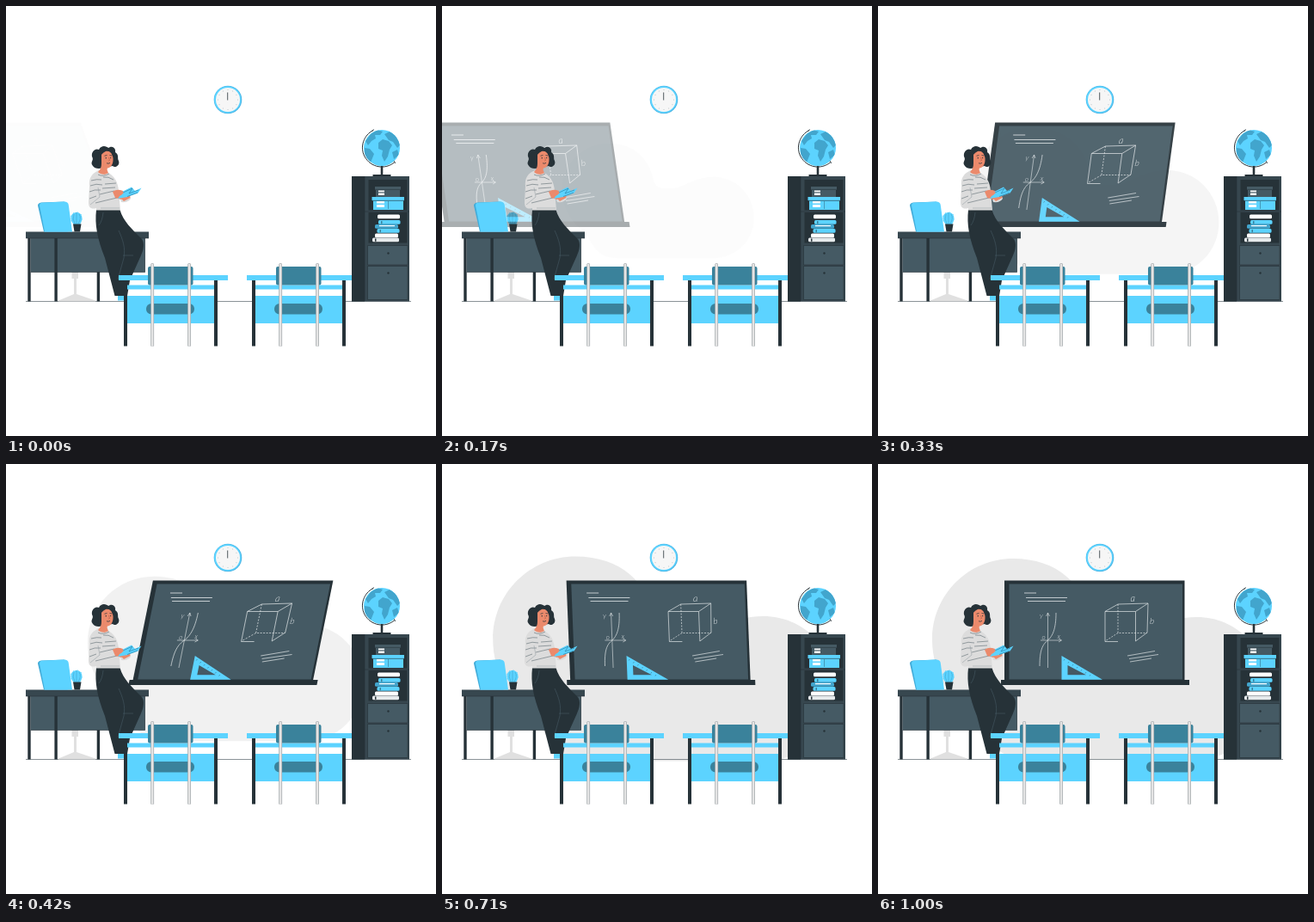
These frames come from a looping animation (500 px wide and 500 px high, 1.04 s). An HTML page with a canvas:

```html
<!DOCTYPE html>
<html lang="en">
<head>
<meta charset="utf-8">
<title>Classroom</title>
<style>
html, body { margin: 0; width: 100%; height: 100%; overflow: hidden; background: #fff; }
canvas { display: block; width: 500px; height: 500px; }
</style>
</head>
<body>
<canvas id="stage" width="500" height="500"></canvas>
<script>
const BLUE = '#5cd3ff', TEAL = '#3a829b', SEA = '#42a5cd';
const DARK = '#263238', MID = '#37474f', SLATE = '#455a64';
const PALE = '#e0e0e0', SKIN = '#eb8a6c', CHALK = '#dfe4e6';
const LOOP = 1040, STEP = 125 / 3, LEAD = 33;

const view = document.getElementById('stage').getContext('2d');
const layer = document.createElement('canvas');
layer.width = layer.height = 500;
const sheet = layer.getContext('2d');
let g = view;

function fill(color, d) {
  g.fillStyle = color;
  g.fill(new Path2D(d), 'evenodd');
}
function line(color, width, d, dash = []) {
  g.strokeStyle = color;
  g.lineWidth = width;
  g.setLineDash(dash);
  g.stroke(new Path2D(d));
  g.setLineDash([]);
}
function box(color, x, y, w, h, r = 0) {
  g.fillStyle = color;
  g.beginPath();
  g.roundRect(x, y, w, h, r);
  g.fill();
}
function disc(color, x, y, r) {
  g.fillStyle = color;
  g.beginPath();
  g.arc(x, y, r, 0, Math.PI * 2);
  g.fill();
}
const clamp = v => Math.min(1, Math.max(0, v));
const mix = (a, b, k) => a + (b - a) * k;

// cubic-bezier(.36, -.01, .5, 1.38)
function ease(p) {
  if (p <= 0) return 0;
  if (p >= 1) return 1;
  const at = (s, a, b) => 3 * (1 - s) ** 2 * s * a + 3 * (1 - s) * s * s * b + s ** 3;
  let lo = 0, hi = 1;
  for (let i = 0; i < 24; i++) {
    const s = (lo + hi) / 2;
    if (at(s, .36, .5) < p) lo = s; else hi = s;
  }
  return at(lo, -.01, 1.38);
}

function backdrop(p) {
  const k = ease(p), scale = mix(.5, 1, k);
  g.save();
  g.globalAlpha = clamp(k);
  g.translate(242, 226.5);
  g.scale(scale, scale);
  g.translate(-242, -226.5);
  fill('#e9e9e9', 'M157 110C209 110 240 140 249 185C254 204 270 201 288 201C312 200 330 178 371 178' +
    'C417 178 453 215 453 261C453 307 417 343 371 343H175C130 343 125 310 108 290C85 272 63 245 63 204C63 152 105 110 157 110Z');
  g.restore();
}

function clock() {
  disc('#4db5e4', 258, 109, 16.3);
  disc(BLUE, 257.7, 108.8, 15.6);
  disc('#f6f6f6', 258, 109, 14);
  for (let i = 0; i < 12; i++) {
    const a = i * Math.PI / 6;
    disc('#8d979c', 258 + 11.5 * Math.sin(a), 109 - 11.5 * Math.cos(a), .45);
  }
  line(DARK, .8, 'M257.7 100.5V109.5');
}

function cactus() {
  fill(BLUE, 'M79 254C74 250 74 241 81 240C88 239 91 247 86 254Z');
  line(SEA, .6, 'M82 240V253M79 242Q77 248 80 253M85 242Q88 247 84 253');
  line(BLUE, .6, 'M75 244l2 1M75 250l3 -1M78 240l2 2M83 239v2M88 242l-2 2M89 248l-3 0');
  fill(DARK, 'M78 253.5H87.5L86 262.5H79.5Z');
}

function label(text, x, y, size) {
  g.fillStyle = CHALK;
  g.font = `italic 300 ${size}px Lato, sans-serif`;
  g.fillText(text, x, y);
}

function boardArt() {
  fill(DARK, 'M147 135.5H356.5V251.5H147Z');
  fill(SLATE, 'M152.5 139.5H354V250.5H152.5Z');
  line(CHALK, .8, 'M170 150H184M172 155.5H220M174 159.5H218');
  line(CHALK, .6, 'M197.5 237V173M195.5 177L197.5 173L199.5 177M189 205H213M210 203L213.5 205L210 207');
  line(CHALK, .7, 'M207 173C207 192 203 200 197.5 205C191 210 188 217 188 235');
  label('y', 188, 179, 8);
  label('o', 190.5, 203.5, 8);
  label('x', 208.5, 202.5, 8);
  line(CHALK, .7, 'M264 171.5H299.5V206M264 171.5V206.5H279M264 171.5L279 163L314 162L299.5 171.5M314 162L313 196L299.5 206');
  line(CHALK, .7, 'M279 163V196.5H313M279 196.5L264 206', [2, 1.5]);
  label('a', 293.5, 159.5, 11);
  label('b', 316, 186, 10);
  line(CHALK, .7, 'M290 223L322 217.5M292 226.5L326 221.5M293 230L318 226');
  fill(BLUE, 'M213.5 223L261 250.8H213.5ZM220.5 234V245.3H242Z');
  line(TEAL, .7, 'M217 227l-1 1.5M222 230l-1 1.5M227 233l-1 1.5M232 236l-1 1.5M237 239l-1 1.5M242 242l-1 1.5M247 245l-1 1.5');
  box(DARK, 143, 251, 219, 6);
}

function board(p) {
  let shift = 0, skew, alpha = 1;
  if (p < .6) {
    const k = ease(p / .6);
    shift = mix(-250, 0, k);
    skew = mix(20, -10, k);
    alpha = clamp(k);
  } else if (p < .8) {
    skew = mix(-10, 2, ease((p - .6) / .2));
  } else {
    skew = mix(2, 0, ease((p - .8) / .2));
  }
  g = sheet;
  g.setTransform(1, 0, 0, 1, 0, 0);
  g.clearRect(0, 0, 500, 500);
  const t = Math.tan(skew * Math.PI / 180);
  g.setTransform(1, 0, t, 1, shift - t * 196.5, 0);
  boardArt();
  g = view;
  g.globalAlpha = alpha;
  g.drawImage(layer, 0, 0);
  g.globalAlpha = 1;
}

function teacherDesk() {
  box(PALE, 76.5, 305, 7.5, 12);
  fill(PALE, 'M79 317H82V335L104 342.5V343.5H61V342.5L79 335Z');
  box(DARK, 25.3, 269, 3.4, 74.5);
  box(DARK, 105.7, 305, 3.4, 38.5);
  box(SLATE, 28.7, 269, 133, 40.5);
  line(DARK, .6, 'M28.7 309.5H161.5V270');
  box(DARK, 56.4, 269, 3.4, 74.5);
  box(MID, 23, 262.5, 143, 7.5);
  line(DARK, .6, 'M23 270H166');
  fill('#42acd9', 'M37 232Q37 229 41 228.5L68 227.5L72 262.5H44Z');
  fill(BLUE, 'M39 232Q39 229 42 228.7L68 227.5Q72 227.5 72.7 231L77 262.5H45Z');
}

function teacher() {
  // shoes and trousers
  fill(BLUE, 'M130 336.5H140L144 340V342.5H130Z');
  fill(DARK, 'M105 237H132.5C136 250 147 260 157 270C162 275 160 283 157 290L144 319L141 337H126.5L115 293C106 270 103 254 105 237Z');
  line(SLATE, .6, 'M131 261C136 272 139 281 137 293L130 318M136 290H148M113 240Q112 250 108 255');

  // sweater
  fill('#dcdcdc', 'M133 225L143 219L145 224Q142 229 134 228Z');
  fill('#dcdcdc', 'M108 191C100 195 96 199 97 210L96 228C96 235 99 236.5 105 235L105 237.5H133L131 215C130 204 126 198 119 194Z');
  line('#5f6c72', .6, 'M99 203Q106 201 111 202M98 209Q105 206 112 208M97 216Q103 213 110 214M113 199Q119 198 125 202' +
    'M115 207L128 206M112 212L127 211M109 219Q117 217 126 215M104 229Q116 226 129 223M97 224L105 221M107 196Q113 199 120 195');
  line('#8e999e', .5, 'M107 211L109 222L98 231M110 235H132');

  // hands and book
  fill(SKIN, 'M124 216Q129 212 136 215L139 220L134 225L127 223Z');
  fill(SKIN, 'M133 223L144 219L144.5 223L137 227Z');
  fill(BLUE, 'M130 224L136 215.5L146 210.5L150 215L157.5 211.5L153.5 217.5L141 222Z');
  line('#2d86aa', .7, 'M136 217L147 212L143 218L154 214M141 221.5L153 217');
  fill(SKIN, 'M126 216Q132 213 137 217L134 220L128 222Z');

  // head
  fill(DARK, 'M101 186C97 181 103 180 100 175C99 169 104 165 108 167C111 161 117 163 119 165C125 161 128 167 127 170' +
    'C132 173 129 177 131 180C133 185 127 189 124 186L112 188C108 190 103 189 101 186Z');
  fill(SKIN, 'M111 174C111 168 117 168 123 170L124.5 177C125 184 122 188 118 188.5C117 190 118 192 119 194C115 197 110 196 107 193C110 190 111 187 111 183Z');
  fill(DARK, 'M110 177C110 171 114 171 117 168C121 169 123 171 124 175L126 169L118 165L109 168Z');
  line(DARK, .7, 'M114.5 174.3l3 -.8M120.5 173.5l2.5 .6M117 182.7Q119 184 121 182.3');
  disc(DARK, 116.2, 176.7, .7);
  disc(DARK, 121.7, 176.6, .7);
  line('#b85e49', .6, 'M119.5 176L120.5 179.5L119 180');
}

function studentDesk(x) {
  g.save();
  g.translate(x, 0);
  box(BLUE, 141, 324.5, 101, 5);
  box(BLUE, 141, 337, 101, 32);
  box(DARK, 137, 318, 4, 77.5);
  box(DARK, 242, 318, 4, 77.5);
  box(BLUE, 131, 313, 127, 6);
  box(TEAL, 163, 346, 56, 12.5, 6);
  box(TEAL, 165, 303, 52.5, 21.5, 2);
  for (const leg of [168.3, 211.2]) {
    box('#969da1', leg, 299, 3.8, 96.5, [2, 2, 0, 0]);
    box('#e4e4e4', leg + .6, 299.5, 2.6, 96, [1.5, 1.5, 0, 0]);
  }
  g.restore();
}

function globe() {
  box(DARK, 435.7, 186, 2.6, 11);
  box(DARK, 426.5, 196, 21, 2);
  disc(BLUE, 437, 165, 21);
  g.save();
  g.beginPath();
  g.arc(437, 165, 21, 0, 7);
  g.clip();
  fill(SEA, 'M418 157L424 149L432 144L438 146L435 150L429 150L430 154L425 157L421 162Z' +
    'M417 165L423 166L428 172L426 177L424 182L417 176Z' +
    'M433 159L438 155L445 157L449 162L446 167L444 175L440 181L437 174L438 168L433 166Z' +
    'M440 149L446 146L454 151L459 161L455 165L450 158L445 156Z' +
    'M449 170L455 167L457 173L451 178Z');
  g.restore();
  line(DARK, 1, 'M427 144.5C416 150 411 164 417 175C424 188 441 191 452 181.5');
  line(DARK, .8, 'M425.5 145.5L428 143.5M451 180L453 183');
}

function shelf() {
  box(MID, 402, 198, 67, 145.5);
  box(DARK, 402, 198, 15, 145.5);
  box(DARK, 421.5, 202, 45, 35.5);
  box(DARK, 421.5, 240, 45, 35.5);
  box(SLATE, 420.5, 278.5, 46.5, 22.5);
  box(SLATE, 420.5, 302.5, 46.5, 39);
  line(DARK, .6, 'M420.5 278.5H467V301H420.5ZM420.5 302.5H467V341.5H420.5ZM417 198V343M417 239H469');
  disc(DARK, 444.5, 287.5, 1.2);
  disc(DARK, 444.5, 310.5, 1.2);

  // storage boxes
  box(SLATE, 429, 210, 30, 3.5);
  box(SLATE, 430, 214, 28, 8);
  box('#fff', 433, 214.5, 7, 1.8);
  box('#fff', 433, 217.5, 7, 2.5);
  box(BLUE, 425.5, 222, 37.5, 4);
  box(BLUE, 427, 226.5, 35, 10.5);
  box('#fff', 431, 227, 9, 2.5);
  box('#fff', 431, 231, 9, 3);
  line(TEAL, .7, 'M426 226.2H463M444.5 227V236');

  // books: x, y, width, cover
  const books = [[432, 242.5, 26, '#fff'], [433, 249, 25.5, BLUE], [429, 254, 27, SEA],
    [431.5, 259, 26, BLUE], [429, 264.5, 27, '#fff'], [426, 269.5, 31, '#e6eaec']];
  books.forEach(([x, y, w, c], i) => {
    box(c, x, y, w, 4.8, 1.5);
    if (i % 2) box(i < 5 ? TEAL : DARK, x + 3, y + 1, 1.5, 3.2);
    else if (i === 2) box('#fff', x + 5, y + 1, 18, 1.2);
  });
  globe();
}

function draw(ms) {
  const p = clamp(ms / 1000);
  g = view;
  g.fillStyle = '#fff';
  g.fillRect(0, 0, 500, 500);
  backdrop(p);
  line('#59656a', .7, 'M23 343.5H471');
  clock();
  cactus();
  board(p);
  teacherDesk();
  teacher();
  studentDesk(0);
  studentDesk(149);
  shelf();
}

const start = performance.now();
let last = -1;
function tick() {
  const t = (performance.now() - start) % LOOP;
  let n = 24;
  while (n > 0 && Math.round(n * STEP / 10) * 10 > t) n--;
  if (n !== last) draw(LEAD + n * STEP);
  last = n;
  requestAnimationFrame(tick);
}
tick();
</script>
</body>
</html>
```
